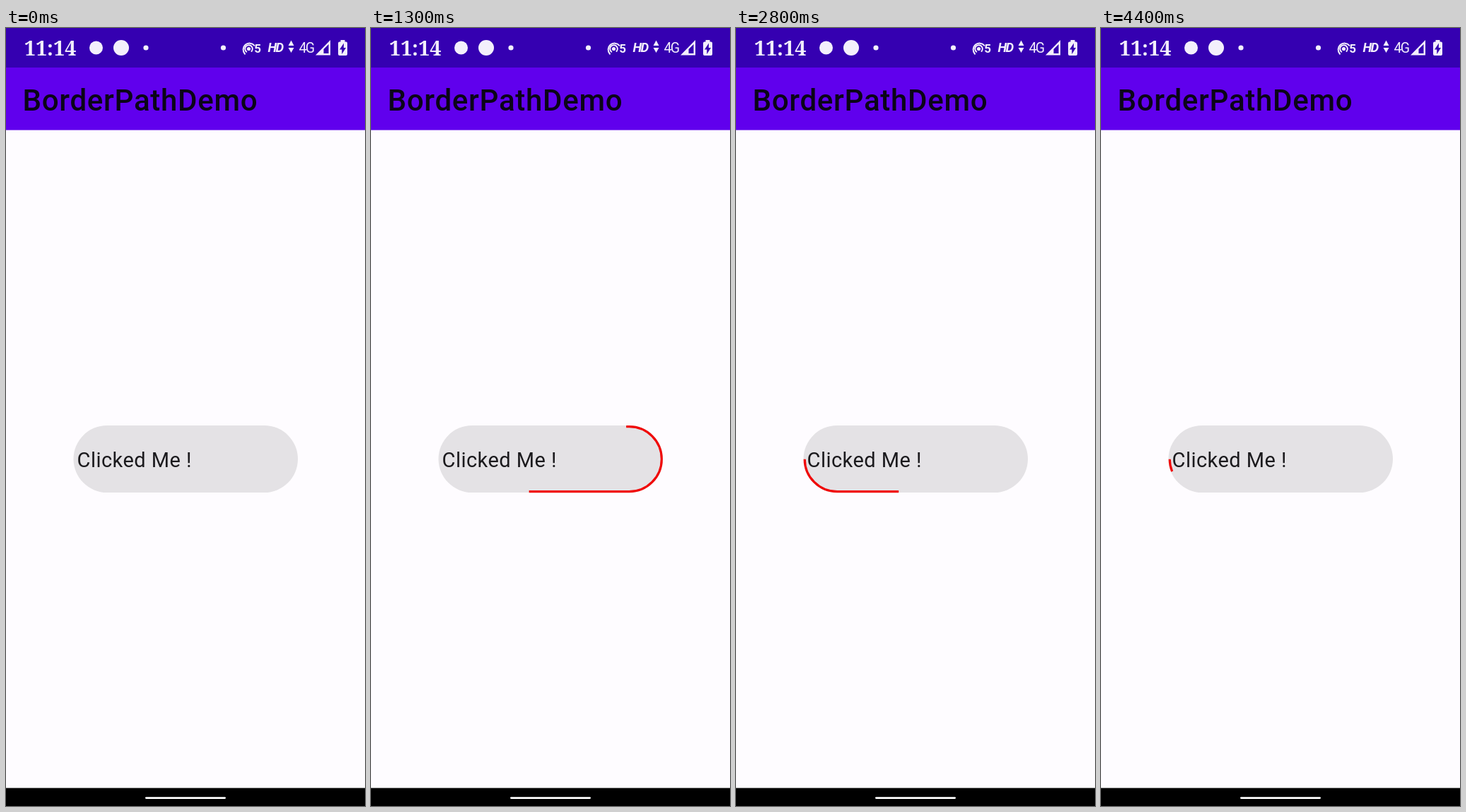
An HTML page for the animation above (4500 ms loop, 508 by 1102 pixels).

```html
<!DOCTYPE html>
<html lang="en">
<head>
<meta charset="utf-8">
<title>Chip with a running border</title>
<style>
  html, body { margin: 0; width: 100%; height: 100%; overflow: hidden; background: #fefcff; }
  svg { display: block; width: 100vw; height: 100vh; }
  text { font-family: Roboto, sans-serif; white-space: pre; }
  .clock { font: 700 29px "Noto Serif", serif; }
  .title { font-size: 42px; font-weight: 500; letter-spacing: .7px; fill: #0b0518; }
  .label { font-size: 29px; letter-spacing: .45px; fill: #1b1a1d; }
  .status { fill: #f3effc; }
  .line { fill: none; stroke: #f3effc; stroke-width: 2; stroke-linecap: round; }
</style>
</head>
<body>
<svg viewBox="0 0 508 1102">
  <rect width="508" height="1102" fill="#fefcff"/>
  <rect width="508" height="144.600" fill="#6000ed"/>
  <rect width="508" height="56" fill="#3500b1"/>
  <rect y="1076.500" width="508" height="26"/>
  <rect x="197" y="1089.200" width="114" height="2.800" rx="1.400" fill="#fff"/>

  <g class="status">
    <text class="clock" x="25.700" y="38.500">11:14</text>
    <circle cx="127.500" cy="28" r="9.500"/>
    <circle cx="163" cy="28" r="11"/>
    <circle cx="198" cy="28" r="3.600"/>

    <g id="network">
      <circle cx="307.500" cy="28" r="3.600"/>
      <circle cx="343.500" cy="29.500" r="2.600"/>
      <path class="line" d="M340.300 33.700A5.300 5.300 0 1 1 347.500 33M338 36.700A9 9 0 1 1 351.500 24.800"/>
      <text x="351.300" y="35" font-size="17" font-weight="700">5</text>
      <text x="370.500" y="34" font-size="18.500" font-weight="700" font-style="italic" letter-spacing="-1.800">HD</text>
    </g>
    <path id="arrows" d="M399.500 25L403.500 17.500L407.500 25ZM399.500 28L403.500 35L407.500 28Z"/>

    <text x="414.500" y="35" font-size="19.500" letter-spacing="-1.600">4G</text>
    <path fill-rule="evenodd" d="M438 38.500L459 17V38.500ZM449.500 30V36H456.500V23Z"/>
    <path d="M473.500 17H479.500V19.500H481Q483 19.500 483 21.500V37Q483 39 481 39H472Q470 39 470 37V21.500Q470 19.500 472 19.500H473.500Z"/>
    <path fill="#3500b1" d="M478 21.500L472 30.500H475.300V37L481 28H477.800Z"/>
  </g>

  <text class="title" x="23.500" y="117">BorderPathDemo</text>

  <rect id="chip" x="95.500" y="563" width="317.500" height="95" rx="47.500"/>
  <path id="runner" pathLength="1" fill="none" stroke="#f00808" stroke-width="3.200"
    d="M97.200 610.700A46 46 0 0 0 143.200 656.700H365.300A46 46 0 0 0 365.300 564.700H143.200A46 46 0 0 0 97.200 610.700"/>
  <text class="label" x="100.600" y="622">Clicked Me !</text>
</svg>
<script>
  const LOOP = 4500, STEP = 100, LAP = 2022, LAP_START = 154;
  const byId = id => document.getElementById(id);
  const runner = byId('runner'), chip = byId('chip');
  const arrows = byId('arrows'), network = byId('network');

  function drawRunner(t) {
    const turn = (t - LAP_START) / LAP;
    runner.style.visibility = turn > 0 ? 'visible' : 'hidden';
    // Ease in and out; the tail leaves once the head is halfway round.
    const head = 0.5 - 0.5 * Math.cos(Math.PI * (turn % 1));
    const tail = Math.max(0, 2 * head - 1);
    runner.setAttribute('stroke-dasharray', `0 ${tail} ${head - tail} 2`);
  }

  function draw(now) {
    const t = Math.floor((now % LOOP) / STEP) * STEP;
    drawRunner(t);
    const pressed = t >= 100 && t <= 600;
    chip.setAttribute('fill', pressed ? '#e0dfe1' : '#e4e2e5');
    const idle = t >= 3100 && t < 4000;
    arrows.style.visibility = idle ? 'hidden' : 'visible';
    network.setAttribute('transform', `translate(${idle ? 10.5 : 0} 0)`);
  }

  function tick() {
    draw(performance.now());
    requestAnimationFrame(tick);
  }
  tick();
</script>
</body>
</html>
```
